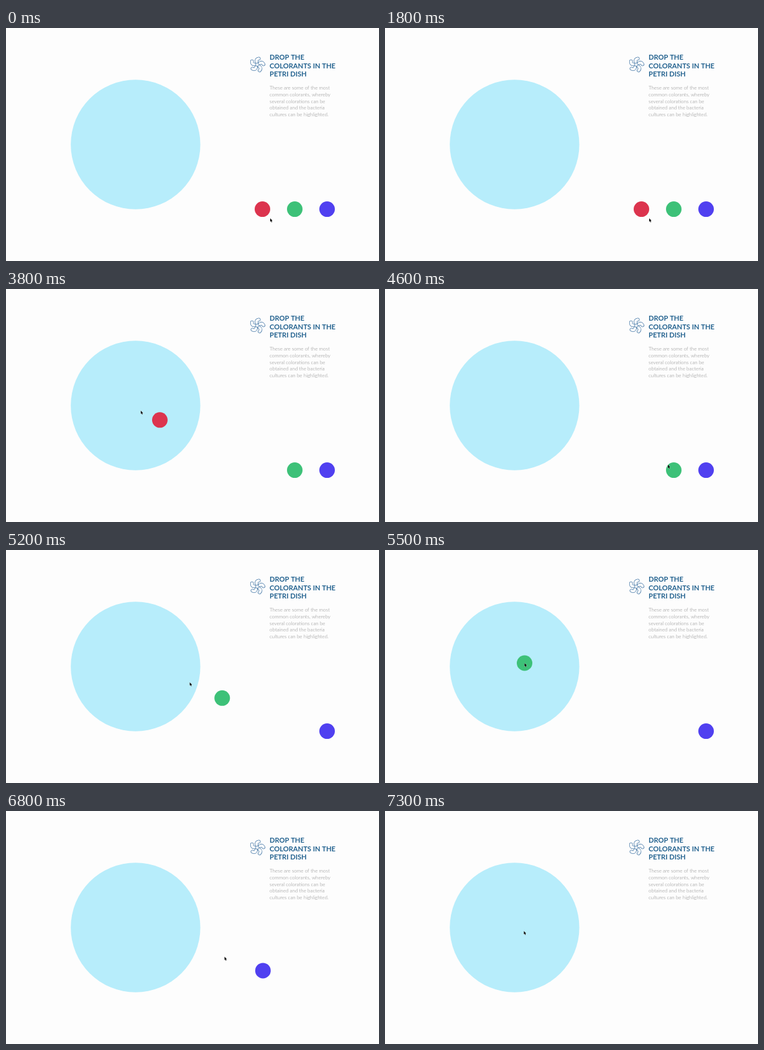
These frames come from a looping animation (600x375 px, 7400 ms). An HTML page with a canvas:

```html
<!DOCTYPE html>
<html lang="en">
<head>
<meta charset="utf-8">
<title>Petri dish</title>
<style>
  html, body { margin: 0; width: 100%; height: 100%; overflow: hidden; background: #fdfdfd; }
  canvas { display: block; width: 100%; height: 100%; }
</style>
</head>
<body>
<canvas id="stage"></canvas>
<script>
const W = 600, H = 375, LOOP = 7400, STEP = 100;
const MOVE = 550, LAG = 80;   // cursor travel time, delay of the dragged drop
const BG = '#fdfdfd';
const canvas = document.getElementById('stage');
const ctx = canvas.getContext('2d');

const title = ['DROP THE', 'COLORANTS IN THE', 'PETRI DISH'];
const body = [
  'These are some of the most', 'common colorants, whereby',
  'several colorations can be', 'obtained and the bacteria',
  'cultures can be highlighted.'
];

// The cursor sets off at `seek`, drags from `grab`, and the drop dissolves at `gone`.
const rest = { x: 425, y: 306.3 };
const drops = [
  { color: '#dc344e', grip: { x: 411, y: 289 }, end: { x: 205, y: 190 }, seek: 1800, grab: 3330, gone: 4100 },
  { color: '#3dc178', grip: { x: 461, y: 285 }, end: { x: 224.5, y: 182 }, seek: 4100, grab: 4850, gone: 5700 },
  { color: '#5040f0', grip: { x: 520, y: 289 }, end: { x: 223.4, y: 193.2 }, seek: 5700, grab: 6500, gone: 7300 }
];
drops.forEach((d, i) => { d.home = { x: 412.5 + 52 * i, y: 291.6 }; });

const mix = (a, b, u) => ({ x: a.x + (b.x - a.x) * u, y: a.y + (b.y - a.y) * u });

// Eased progress of a move that begins at `from`
function progress(t, from) {
  const u = Math.min(1, Math.max(0, (t - from) / MOVE));
  return u * u * (3 - 2 * u);
}

function cursorAt(t) {
  return drops.reduce((p, d) =>
    mix(mix(p, d.grip, progress(t, d.seek)), d.end, progress(t, d.grab)), rest);
}

function disc(p, r, color) {
  ctx.fillStyle = color;
  ctx.beginPath();
  ctx.arc(p.x, p.y, r, 0, Math.PI * 2);
  ctx.fill();
}

function lines(list, x, y, gap, font, color) {
  ctx.font = font;
  ctx.fillStyle = color;
  list.forEach((s, i) => ctx.fillText(s, x, y + i * gap));
}

// Ring of bent bacteria: a wide stroke with a narrower one inside
function icon(x, y, count) {
  ctx.save();
  ctx.translate(x, y);
  ctx.rotate(-0.3);
  ctx.lineCap = 'round';
  for (let i = 0; i < count; i++) {
    ctx.rotate(Math.PI * 2 / count);
    ctx.beginPath();
    ctx.moveTo(4.6, -1);
    ctx.quadraticCurveTo(9, -2.5, 9.8, 2.4);
    for (const [width, color] of [[5.6, '#4f7fab'], [4, BG]]) {
      ctx.lineWidth = width;
      ctx.strokeStyle = color;
      ctx.stroke();
    }
  }
  ctx.restore();
}

function arrow(p) {
  ctx.save();
  ctx.translate(p.x, p.y);
  ctx.scale(0.9, 0.9);
  const shape = new Path2D('M0 0V6L1.3 4.9 2.3 7.1 3.4 6.6 2.4 4.5 4.2 4.4Z');
  ctx.lineJoin = 'round';
  ctx.lineWidth = 0.9;
  ctx.strokeStyle = 'rgba(255,255,255,.6)';
  ctx.stroke(shape);
  ctx.fillStyle = '#080808';
  ctx.fill(shape);
  ctx.restore();
}

function draw(t) {
  ctx.fillStyle = BG;
  ctx.fillRect(0, 0, W, H);
  disc({ x: 208.4, y: 187.5 }, 104.2, '#b7edfb');
  icon(404.2, 59, 5);
  lines(title, 424, 51.4, 13.3, 'bold 11.15px Lato, sans-serif', '#23628f');
  lines(body, 424, 99.4, 10.65, '300 8.05px Lato, sans-serif', '#868686');
  for (const d of drops) {
    if (t < d.gone) disc(mix(d.home, d.end, progress(t, d.grab + LAG)), 12.5, d.color);
  }
  arrow(cursorAt(t));
}

function resize() {
  const dpr = window.devicePixelRatio || 1;
  canvas.width = Math.round(innerWidth * dpr);
  canvas.height = Math.round(innerHeight * dpr);
}

const start = performance.now();
function tick() {
  const t = (performance.now() - start) % LOOP;
  ctx.setTransform(canvas.width / W, 0, 0, canvas.height / H, 0, 0);
  draw(Math.floor(t / STEP) * STEP);
  requestAnimationFrame(tick);
}

addEventListener('resize', resize);
resize();
tick();
</script>
</body>
</html>
```
